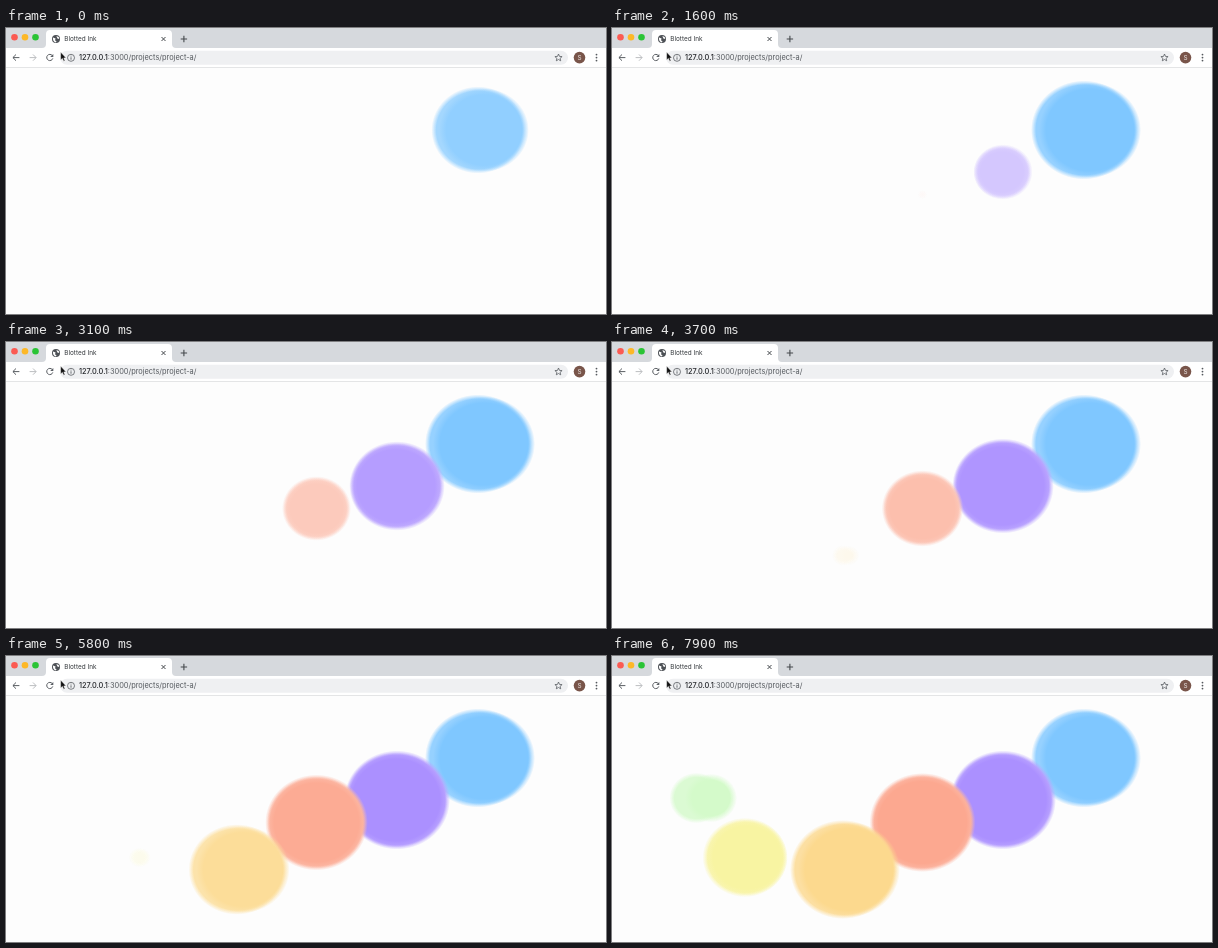
Animation of 600x286 px, one loop 8000 ms. Source, as an HTML page with a canvas:

```html
<!DOCTYPE html>
<html lang="en">
<head>
<meta charset="utf-8">
<title>Blotted Ink</title>
<style>
  html, body { margin: 0; width: 100%; height: 100%; overflow: hidden; background: #fdfdfd; }
  canvas, svg { position: absolute; left: 0; top: 0; width: 600px; height: 286px; }
  text { font-family: Inter, Roboto, sans-serif; }
</style>
</head>
<body>
<canvas id="stage" width="600" height="286"></canvas>
<svg viewBox="0 0 600 286">
  <!-- tab strip -->
  <rect width="600" height="20" fill="#d6d9dd"/>
  <circle cx="8.5" cy="9.3" r="3.3" fill="#fb5a52"/>
  <circle cx="19" cy="9.3" r="3.3" fill="#fdb827"/>
  <circle cx="29.5" cy="9.3" r="3.3" fill="#2ac435"/>
  <path d="M36 20Q40 20 40 16V6Q40 2 44 2H162Q166 2 166 6V16Q166 20 170 20Z" fill="#fff"/>
  <circle cx="50" cy="11" r="4" fill="#4d5156"/>
  <path d="M47 9.4L49.6 10.6L49 12.2L50.6 13.6L49.6 14.4Q46.6 13.4 47 9.4ZM50.4 8L52.8 9L53.2 11L51.4 10.6Z" fill="#fff"/>
  <text x="58.3" y="13.4" font-size="6.4" fill="#35393d">Blotted Ink</text>
  <g fill="none" stroke="#44484c" stroke-width="1">
    <path d="M155.5 9L159.5 13M159.5 9L155.5 13"/>
    <path d="M174.7 11H181.1M177.9 7.8V14.2" stroke-width="1.1"/>
  </g>
  <!-- toolbar -->
  <rect y="20" width="600" height="19" fill="#fff"/>
  <rect y="39" width="600" height="1" fill="#e4e5e6"/>
  <rect x="54" y="22.7" width="508" height="14" rx="7" fill="#eff0f2"/>
  <g fill="none" stroke="#5a5e63" stroke-width="1">
    <path d="M13.4 29.6H7M10 26.5L6.9 29.6L10 32.7"/>
    <path d="M23.6 29.6H30M27 26.5L30.1 29.6L27 32.7" stroke="#bcbec1"/>
    <path d="M46.3 27.6A3.1 3.1 0 1 0 46.8 30.4"/>
    <circle cx="65" cy="29.8" r="3.5" stroke-width=".8"/>
    <path d="M65 29.3V31.7M65 27.7V28.5" stroke-width=".9"/>
    <path d="M552.5 26L553.5 28.4L556.1 28.6L554.1 30.3L554.7 32.8L552.5 31.5L550.3 32.8L550.9 30.3L548.9 28.6L551.5 28.4Z" stroke-width=".8"/>
  </g>
  <path d="M47.3 26V29.1H44.2Z" fill="#5a5e63"/>
  <text x="73" y="32.3" font-size="7.4" fill="#55595e"><tspan fill="#222428" font-weight="500">127.0.0.1</tspan>:3000/projects/project-a/</text>
  <circle cx="573.5" cy="29.6" r="5.8" fill="#79554a"/>
  <text x="573.5" y="31.9" font-size="6.4" fill="#f3eeec" text-anchor="middle">S</text>
  <g fill="#55595e">
    <circle cx="590.5" cy="26.6" r=".9"/>
    <circle cx="590.5" cy="29.6" r=".9"/>
    <circle cx="590.5" cy="32.6" r=".9"/>
  </g>
  <path d="M54.6 24V32L56.4 30.4L57.7 33.3L59 32.7L57.8 29.9H60.1Z" fill="#111" stroke="#fff" stroke-width=".5"/>
</svg>
<script>
const LOOP = 8000, STEP = 100;
const PAPER = 253, RX = 53, RY = 49.5;
const ctx = document.getElementById("stage").getContext("2d");

// start and tau (ms) set the growth; shift moves the inner layer sideways
const blobs = [
  { x: 472,   y: 102,   shift: 6,    start: -1365, tau: 750,  color: [127, 199, 255] },
  { x: 391,   y: 144,   shift: -1,   start: 650,   tau: 1250, color: [171, 144, 255] },
  { x: 310.5, y: 166.5, shift: 0,    start: 1450,  tau: 1700, color: [252, 168, 144] },
  { x: 231,   y: 213.5, shift: 6,    start: 3450,  tau: 1150, color: [252, 217, 142] },
  { x: 133,   y: 201.5, shift: 2,    start: 5450,  tau: 1700, color: [246, 241, 134] },
  { x: 84.5,  y: 142,   shift: 14.5, start: 6900,  tau: 1500, color: [161, 246, 139] }
];

// Fast at first, then settling at full size
const grow = (age, tau) => Math.min(1, 1.05 * (1 - Math.exp(-age / tau)));

function softEllipse(x, y, rx, ry, feather, rgb) {
  const fill = ctx.createRadialGradient(0, 0, 0, 0, 0, 1);
  fill.addColorStop(Math.max(0, 1 - feather / rx), `rgb(${rgb})`);
  fill.addColorStop(1, `rgba(${rgb},0)`);
  ctx.save();
  ctx.translate(x, y);
  ctx.scale(rx, ry);
  ctx.fillStyle = fill;
  ctx.beginPath();
  ctx.arc(0, 0, 1, 0, 2 * Math.PI);
  ctx.fill();
  ctx.restore();
}

function drawBlob({ x, y, shift, start, tau, color }, t) {
  if (t <= start) return;
  const size = grow(t - start, tau);
  const layer = (dx, inset, feather, tint) => {
    const ink = tint * size ** 1.2;
    const rgb = color.map(c => Math.round(PAPER + (c - PAPER) * ink));
    softEllipse(x + dx, y, (RX - inset) * size, (RY - inset) * size, feather, rgb);
  };
  layer(0, 0, 5, .82);
  layer(shift, 2, 7, 1);
}

const begin = performance.now();
function frame() {
  const elapsed = (performance.now() - begin) % LOOP;
  const t = Math.floor(elapsed / STEP) * STEP;
  ctx.clearRect(0, 0, 600, 286);
  blobs.forEach(blob => drawBlob(blob, t));
  requestAnimationFrame(frame);
}
frame();
</script>
</body>
</html>
```
